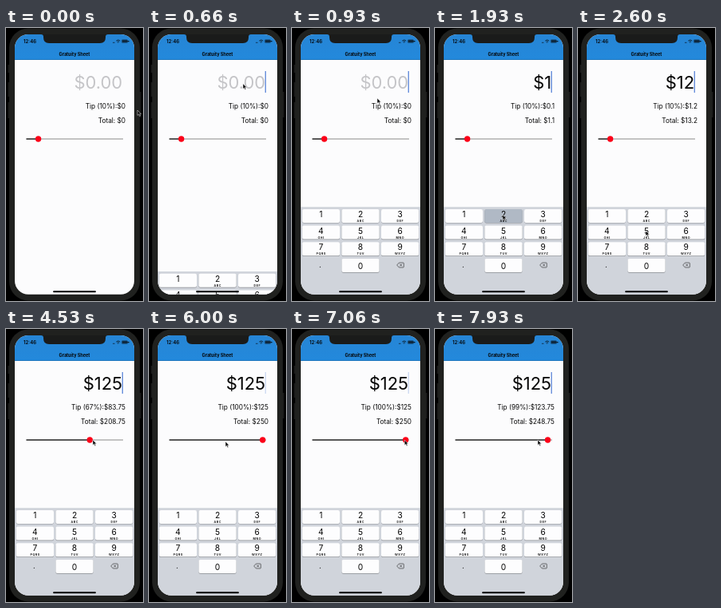
Recreate the animation shown at these times as an HTML page. Size 172x342 px, loop 8 s.

```html
<!DOCTYPE html>
<html lang="en">
<head>
<meta charset="utf-8">
<title>Gratuity Sheet</title>
<style>
  html, body { margin: 0; width: 100%; height: 100%; overflow: hidden; background: #000; }
  svg { display: block; width: 100%; height: 100%; }
  text { font-family: Inter, Roboto, sans-serif; fill: #050505; }
  .right { text-anchor: end; }
  .mid { text-anchor: middle; }
  #amount { font-size: 22px; letter-spacing: -.1px; }
  .label { font-size: 8.25px; }
  .digit { font-size: 10.2px; }
  .letters { font-size: 3.7px; font-weight: 600; letter-spacing: .5px; }
</style>
</head>
<body>
<svg viewBox="0 0 172 342">
  <defs>
    <clipPath id="screen"><rect x="11" y="8" width="150" height="325.7" rx="17"/></clipPath>
    <linearGradient id="bar" x2="0" y2="1">
      <stop stop-color="#2685d5"/><stop offset="1" stop-color="#2389dc"/>
    </linearGradient>
  </defs>

  <path d="M3.5 46v10M3.5 68v18M3.5 93v20M168.5 80v32" stroke="#1b1b1b" stroke-width="2"/>
  <rect x="4" y="0.5" width="164" height="341" rx="24" fill="#20211f"/>

  <g clip-path="url(#screen)">
    <rect x="11" y="8" width="150" height="327" fill="#fcfcfd"/>
    <rect x="11" y="8" width="150" height="32" fill="url(#bar)"/>
    <rect x="11" y="39.4" width="150" height=".6" fill="#1c6cab"/>
    <path d="M44 8q3 0 3 3v1q0 7 7 7h64q7 0 7-7v-1q0-3 3-3z" fill="#1a1b1a"/>
    <text x="22" y="19" font-size="6" font-weight="600">12:46</text>
    <text class="mid" x="86" y="34.6" font-size="5.5" font-weight="700">Gratuity Sheet</text>
    <g fill="none" stroke="#0b1c2b">
      <path d="M134 18.3h3" stroke-dasharray=".8 .5"/>
      <path d="M138.4 16q2.4-2.2 4.8 0M139.5 17.3q1.3-1.1 2.6 0M140.5 18.4h.6" stroke-width=".9"/>
      <rect x="145.3" y="14.7" width="7.4" height="3.8" rx="1" stroke-width=".5"/>
      <path d="M146 16.6h6M153.4 16v1.2" stroke-width="2.5" stroke-dasharray="6 1.2 .6"/>
    </g>

    <text id="amount" class="right" x="146" y="75.8"></text>
    <rect id="caret" x="145.7" y="54" width="1.1" height="27" fill="#3f70d2"/>
    <text id="tip" class="label right" x="150" y="100.8"></text>
    <text id="total" class="label right" x="150" y="118.6"></text>

    <path d="M25.5 139H147" stroke="#b0b0b0" stroke-width="1.5"/>
    <path id="filled" stroke="#343434" stroke-width="1.5"/>
    <circle id="thumb" cy="139" r="3.7" fill="#fb0019"/>

    <g id="keyboard">
      <rect x="11" y="224.2" width="150" height="112" fill="#d0d4db"/>
      <g id="keys"></g>
      <circle cx="35.3" cy="299.3" r=".6"/>
      <path d="M131.7 297l2.7-3h5q1 0 1 1v4q0 1-1 1h-5z" fill="none" stroke="#222" stroke-width=".6"/>
      <path d="M135.3 295.6l2.8 2.8m0-2.8l-2.8 2.8" stroke="#222" stroke-width=".6"/>
    </g>
    <path d="M60 330.3h52" stroke="#050505" stroke-width="1.9" stroke-linecap="round"/>
  </g>

  <path id="cursor" d="M-1-1v6.4l1.5-1.3 1.1 2.4 1.1-.5-1.1-2.3h2z" fill="#080808" stroke="#eee" stroke-width=".5"/>
</svg>

<script>
const LOOP = 8000, FRAME = 1000 / 15;
const $ = id => document.getElementById(id);
const set = (el, attrs) => Object.entries(attrs).forEach(([k, v]) => el.setAttribute(k, v));

// Each point is [time, ...values]
const cursorPath = [
  [0, 166, 104], [430, 119, 70], [650, 119, 71], [930, 108, 89], [1450, 37, 235], [1670, 37, 235],
  [1900, 86, 235], [2330, 86, 235], [2600, 86, 255], [3050, 86, 255], [3640, 43, 139],
  [3800, 43, 139], [4530, 110, 140], [5000, 149, 140], [5350, 153, 141], [6000, 97, 142],
  [6400, 97, 142], [7100, 145, 140], [7330, 145, 140], [7500, 144, 140], [7900, 130, 140]
];
const percentPath = [[0, 10], [3800, 10], [4530, 67], [4950, 100], [7330, 100], [7470, 99]];
const keyboardPath = [[0, 111], [480, 111], [830, 0]];
const presses = [["1", 1530, 1670], ["2", 1920, 2060], ["5", 2660, 2800]];

function along(path, t) {
  const next = path.findIndex(p => p[0] > t);
  if (next < 0) return path.at(-1).slice(1);
  const a = path[next - 1], b = path[next];
  const u = (t - a[0]) / (b[0] - a[0]);
  const eased = u * u * (3 - 2 * u);
  return a.slice(1).map((v, i) => v + (b[i + 1] - v) * eased);
}

const letters = ["", "ABC", "DEF", "GHI", "JKL", "MNO", "PQRS", "TUV", "WXYZ"];
const keyRects = {};

function addKey(name, sub, col, row) {
  const x = 12.8 + col * 49.6, y = 226.9 + row * 20.7, mid = x + 23.6;
  const key = document.createElementNS("http://www.w3.org/2000/svg", "g");
  key.innerHTML = `
    <rect x="${x}" y="${y + .7}" width="47.2" height="17" rx="2" fill="#8b8e94"/>
    <rect x="${x}" y="${y}" width="47.2" height="17" rx="2"/>
    <text class="digit mid" x="${mid}" y="${y + (name === "0" ? 12.6 : 10)}">${name}</text>
    <text class="letters mid" x="${mid + .2}" y="${y + 16}">${sub}</text>`;
  keyRects[name] = key.children[1];
  $("keys").append(key);
}
letters.forEach((sub, i) => addKey(String(i + 1), sub, i % 3, Math.floor(i / 3)));
addKey("0", "", 1, 3);

const money = v => "$" + +v.toFixed(2);

function caretOpacity(t) {
  if (t < 500) return 0;
  if (t < 2900) return 1;
  const phase = t % 1000;
  if (phase < 350) return Math.max(0, .3 - phase / 500);
  return Math.min(1, (phase - 350) / 150, .3 + (1000 - phase) / 100);
}

function draw(t) {
  const typed = presses.filter(p => t >= p[2]).map(p => p[0]).join("");
  const percent = Math.round(along(percentPath, t)[0]);
  const tip = typed * percent / 100;
  $("amount").textContent = typed ? "$" + typed : "$0.00";
  $("amount").style.fill = typed ? "#050505" : "#c5c5c8";
  $("tip").textContent = `Tip (${percent}%):${money(tip)}`;
  $("total").textContent = `Total: ${money(+typed + tip)}`;

  const x = 29.2 + 1.135 * percent;
  set($("thumb"), { cx: x });
  set($("filled"), { d: `M25.5 139H${x}` });
  set($("caret"), { opacity: caretOpacity(t) });
  set($("keyboard"), { transform: `translate(0 ${along(keyboardPath, t)[0]})` });
  set($("cursor"), { transform: `translate(${along(cursorPath, t)})` });

  const held = presses.find(p => t >= p[1] && t < p[2]);
  for (const name in keyRects)
    set(keyRects[name], { fill: held && held[0] === name ? "#b0b9c5" : "#fdfdfe" });
}

function tick() {
  const t = performance.now() % LOOP;
  draw(Math.floor((t + 4) / FRAME) * FRAME % LOOP);
  requestAnimationFrame(tick);
}
tick();
</script>
</body>
</html>
```
